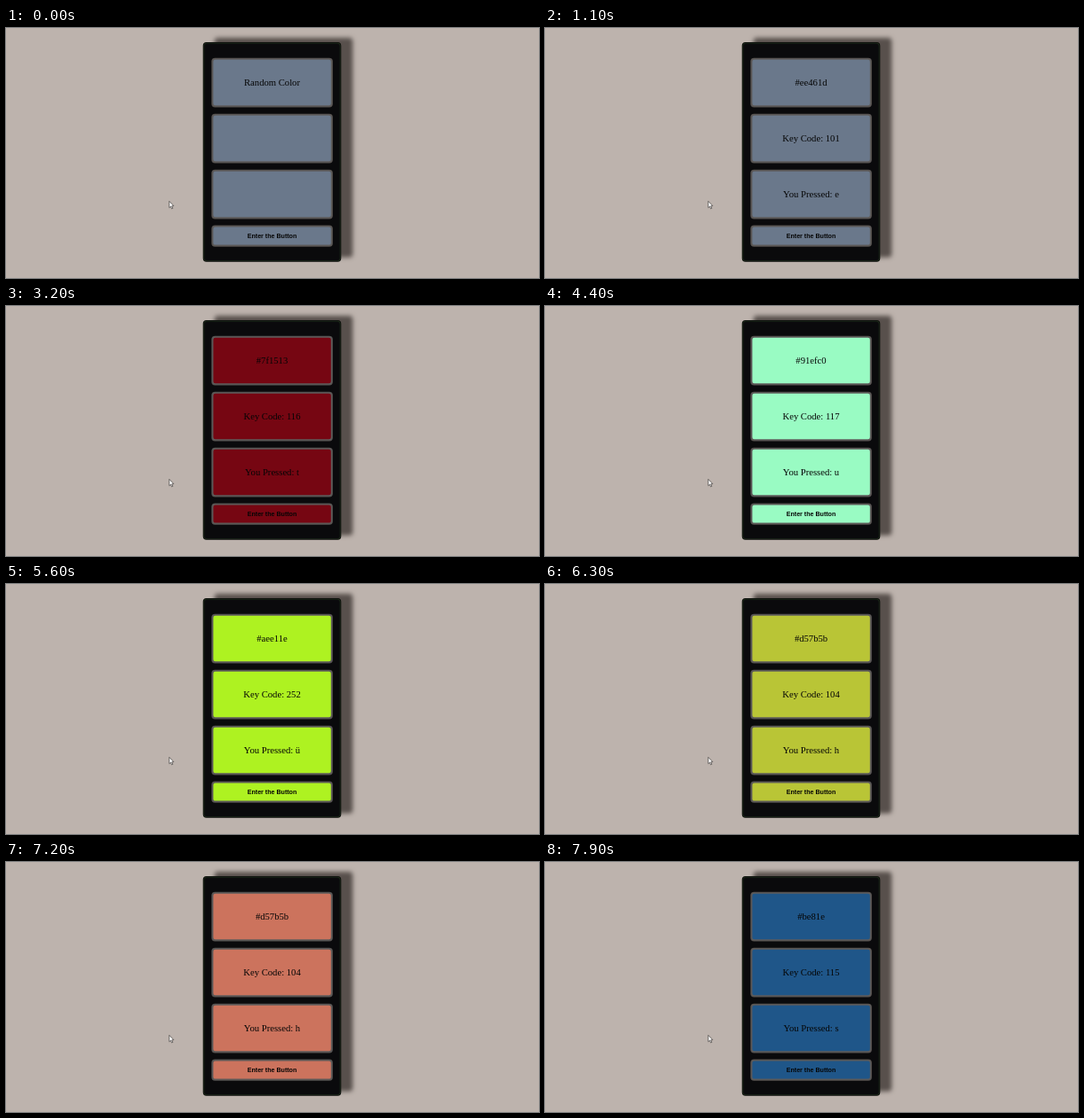
These frames come from a looping animation (600 by 282 pixels, 8000 ms). An HTML page with a canvas:

```html
<!DOCTYPE html>
<html lang="en">
<head>
<meta charset="utf-8">
<title>Random Color</title>
<style>
html, body { margin: 0; width: 100%; height: 100%; overflow: hidden; background: #bdb3ad; }
canvas { display: block; width: 600px; height: 282px; }
</style>
</head>
<body>
<canvas id="stage"></canvas>
<script>
const W = 600, H = 282, LOOP = 8000, FADE = 500, MID = 299.5;
const canvas = document.getElementById('stage');
const ctx = canvas.getContext('2d');
const dpr = window.devicePixelRatio || 1;
canvas.width = W * dpr;
canvas.height = H * dpr;

// One entry per key press: time, fill colour, caption, key.
const presses = [
  { at: 0, rgb: [106, 120, 139], hex: 'Random Color', key: '' },
  { at: 1100, rgb: [222, 54, 33], hex: '#ee461d', key: 'e' },
  { at: 2700, rgb: [118, 6, 18], hex: '#7f1513', key: 't' },
  { at: 3800, rgb: [153, 251, 195], hex: '#91efc0', key: 'u' },
  { at: 5000, rgb: [174, 242, 33], hex: '#aee11e', key: 'ü' },
  { at: 6100, rgb: [204, 115, 93], hex: '#d57b5b', key: 'h' },
  { at: 7250, rgb: [31, 86, 137], hex: '#be81e', key: 's' }
];

// Top and height of the three panels and the button.
const panels = [[33.7, 55.7], [96.7, 55.7], [159.7, 55.7], [222.4, 24.3]];

function box(x, y, w, h, r, fill) {
  ctx.beginPath();
  ctx.roundRect(x, y, w, h, r);
  ctx.fillStyle = fill;
  ctx.fill();
}

function label(text, y, font) {
  ctx.font = font;
  ctx.fillStyle = '#050505';
  ctx.fillText(text, MID, y);
}

function drawCard() {
  ctx.save();
  ctx.shadowColor = '#58504c';
  ctx.shadowBlur = 5 * dpr;
  ctx.shadowOffsetX = 13 * dpr;
  ctx.shadowOffsetY = -5 * dpr;
  box(221.7, 16, 155.6, 247.8, 4, '#080a08');
  ctx.restore();
  box(222.4, 16.7, 154.2, 246.4, 3.4, '#1b2618');
  box(223.4, 17.8, 152.2, 244.4, 2.6, '#0a0a0c');
}

function drawPanel(y, h, fill) {
  box(231.3, y, 136.6, h, 4, '#55514f');
  box(232.2, y + 0.9, 134.8, h - 1.8, 3.2, '#5d5b5a');
  box(233.4, y + 2.1, 132.4, h - 4.2, 2.2, fill);
}

function drawCursor() {
  const pts = [[0, 0], [0, 7.3], [1.7, 5.8], [2.8, 8.5], [4, 8], [2.9, 5.4], [5, 5.2]];
  ctx.beginPath();
  for (const [x, y] of pts) ctx.lineTo(183.8 + x, 195.4 + y);
  ctx.closePath();
  ctx.fillStyle = '#fff';
  ctx.fill();
  ctx.lineWidth = 0.7;
  ctx.strokeStyle = '#3c3937';
  ctx.stroke();
}

function draw(t) {
  const i = presses.findLastIndex(p => p.at <= t);
  const now = presses[i], prev = presses[Math.max(0, i - 1)];
  const p = Math.min(1, (t - now.at) / FADE);
  const e = p * p * (3 - 2 * p);
  const mix = now.rgb.map((c, k) => Math.round(prev.rgb[k] + (c - prev.rgb[k]) * e));
  const fill = `rgb(${mix})`;

  ctx.setTransform(dpr, 0, 0, dpr, 0, 0);
  ctx.fillStyle = '#bdb3ad';
  ctx.fillRect(0, 0, W, H);
  drawCard();
  for (const [y, h] of panels) drawPanel(y, h, fill);

  const serif = '10.65px "Liberation Serif", "Times New Roman", serif';
  ctx.textAlign = 'center';
  label(now.hex, 65.2, serif);
  if (now.key) {
    label('Key Code: ' + now.key.charCodeAt(0), 128.2, serif);
    label('You Pressed: ' + now.key, 191.2, serif);
  }
  label('Enter the Button', 237, 'bold 7.1px "Liberation Sans", Arial, sans-serif');
  drawCursor();
}

let start;
function tick(time) {
  start ??= time;
  draw((time - start) % LOOP);
  requestAnimationFrame(tick);
}
draw(0);
requestAnimationFrame(tick);
</script>
</body>
</html>
```
